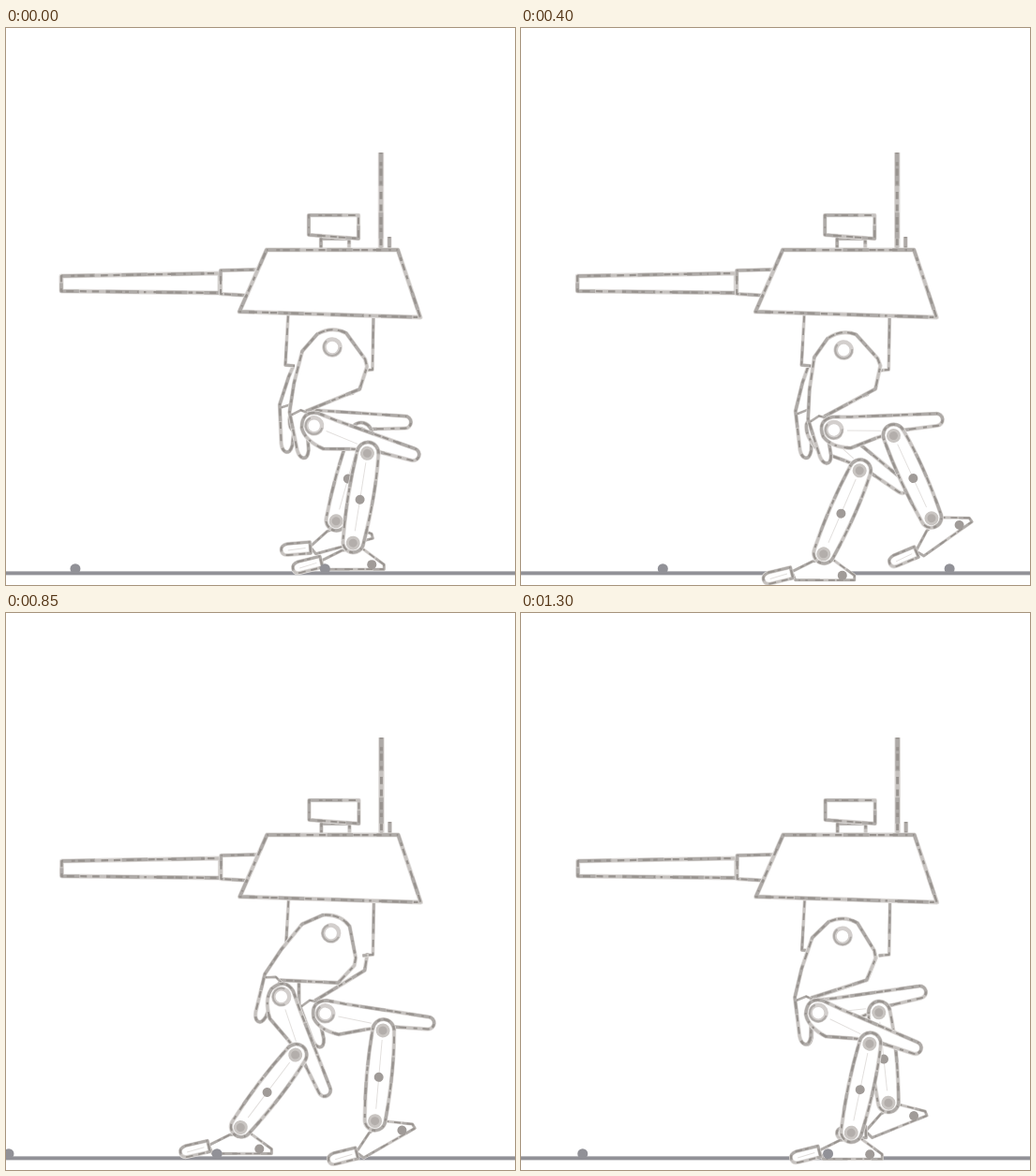
Animation, 543 px wide and 595 px high, one loop 1.4 s. Source, as an HTML page with a canvas:

```html
<!DOCTYPE html>
<html lang="en">
<head>
<meta charset="utf-8">
<title>Walking turret</title>
<style>
html, body { margin: 0; width: 100%; height: 100%; overflow: hidden; background: #fff; }
canvas { display: block; }
</style>
</head>
<body>
<canvas id="stage" width="543" height="595"></canvas>
<script>
const ctx = document.getElementById('stage').getContext('2d');
const LOOP = 1400, STEPS = 19, STRIDE = 328;
const THIGH = 86, ARM = 64, SHIN = 97, ARM_BEND = 11.5;
const GROUND = '#919197';

const rad = deg => deg * Math.PI / 180;
const mix = (a, b, k) => a + (b - a) * k;

// Drawings last 50 ms; the ones held here last twice as long.
const held = [0, 7, 9, 10, 14, 15, 16, 17, 18];
function stepAt(time) {
  let step = -1;
  while (time >= 0) time -= held.includes(++step) ? 100 : 50;
  return step;
}

// One walking cycle in degrees: thigh, arm, shin, foot, toe droop.
const gait = [
  [38, 65, 37, 0, 13],    // reach
  [18, 67, 46, 0, 13],    // plant
  [18, 20, 12, 0, 14],    // mid stance
  [13, 16, 9, 0, 14],     // late stance
  [4, 5, 5, -30, 14],     // heel up
  [6, 8, -10, -31, 14],   // push
  [2, -3, -34, -42, 33],  // toe off
  [17, -12, -6, -22, 2],  // pass
  [30, 18, 48, -5, 9]     // swing
];

// Key points [step, value]; gait values count poses and run on past the cycle's end.
const nearGait = [[0, 3], [5, 5], [8, 7], [10, 8], [13, 9], [13.5, 10], [16, 11], [18, 11.1], [19, 12]];
const farGait = [[0, 7.4], [2.5, 8], [5, 10], [8, 11], [13, 13], [16, 15], [18, 16], [19, 16.4]];
const travel = [[0, 0], [5, 52], [8, 141], [13, 203], [16, 312], [18, 315], [19, STRIDE]];

function valueAt(keys, step) {
  const i = keys.findIndex(key => key[0] > step);
  const [s0, v0] = keys[i - 1], [s1, v1] = keys[i];
  return mix(v0, v1, (step - s0) / (s1 - s0));
}

function poseAt(phase) {
  const i = Math.floor(phase);
  const next = gait[(i + 1) % gait.length];
  return gait[i % gait.length].map((v, n) => mix(v, next[n], phase - i));
}

let seed = 7;
function random() {
  seed = seed * 16807 % 2147483647;
  return seed / 2147483647;
}
const grain = Array.from({ length: 24 }, () => 1.5 + random() * 8);
const shade = Array.from({ length: 10 }, () => 8 + random() * 30);

function stroke(path, width, color, dash = []) {
  ctx.setLineDash(dash);
  ctx.lineWidth = width;
  ctx.strokeStyle = color;
  ctx.stroke(path);
}

// Soft grey line of uneven darkness.
function pencil(path, width = 4.5, fill = '#fff') {
  if (fill) { ctx.fillStyle = fill; ctx.fill(path); }
  ctx.lineJoin = 'round';
  stroke(path, width, '#e0dddb');
  stroke(path, width * 0.65, '#c6c2bf');
  stroke(path, width * 0.7, '#aeaaa7', shade);
  stroke(path, width * 0.45, '#98938f', grain);
}

function poly(points, closed = true) {
  const path = new Path2D();
  points.forEach(([x, y]) => path.lineTo(x, y));
  if (closed) path.closePath();
  return path;
}

function disc(x, y, r) {
  const path = new Path2D();
  path.arc(x, y, r, 0, Math.PI * 2);
  return path;
}

function spot(x, y, r, color = '#a09b98') {
  ctx.fillStyle = color;
  ctx.fill(disc(x, y, r));
}

function hinge() {
  stroke(disc(0, 0, 8.5), 4.5, '#d3cfcd');
  stroke(disc(0, 0, 9), 2, '#aeaaa7', shade);
}

const faint = (...points) => stroke(poly(points, false), 1, '#e2dfdd');

// Draws in a turned frame and returns where its local point (px, py) lands.
function at([x, y], degrees, draw, px = 0, py = 0) {
  const c = Math.cos(rad(degrees)), s = Math.sin(rad(degrees));
  ctx.save();
  ctx.translate(x, y);
  ctx.rotate(rad(degrees));
  draw();
  ctx.restore();
  return [x + px * c - py * s, y + px * s + py * c];
}

const thighShape = new Path2D(
  'M-46 69 L-41 38 L-32 4 L-16 -14 Q0 -23 15 -15 L35 13 L37 21 L29 45 L-28 68' +
  ' L-26 110 Q-27 119 -32 118 Q-36 117 -38 110 Z');
const armShape = new Path2D(
  'M-12 6 Q-17 -12 0 -14 L20 -12 L110 -6 A6.5 6.5 0 0 1 110 7 L68 8 L45 13 L16 21 Q-5 18 -12 6 Z');
const shinShape = new Path2D(
  'M-11 0 A11.5 12 0 0 1 12 0 Q16 42 11 96 A11 11 0 0 1 -11 96 Q-15 48 -11 0 Z');
const footShape = poly([[-34, 19], [-12, 8], [10, 6], [33, 23], [33, 28], [-30, 28]]);
const toeShape = new Path2D('M0 -6 L-24 -6 Q-31 -5 -31 0 Q-31 6 -24 6 L0 6 Z');

function drawThigh() {
  pencil(thighShape);
  pencil(poly([[-44, 72], [-34, 67], [-26, 70]], false), 3, null);
  hinge();
}

function drawArm() {
  pencil(armShape);
  faint([14, 2], [50, 6]);
  hinge();
}

function drawShin() {
  pencil(shinShape);
  faint([0, 10], [0, 84]);
  for (const y of [0, SHIN]) {
    spot(0, y, 7.5, '#c9c5c2');
    spot(0, y, 4.5, '#b3aeab');
  }
  spot(0, 50, 5);
}

function drawFoot() {
  pencil(footShape, 3.5);
  spot(20, 23, 5);
}

function drawToe() {
  pencil(toeShape, 4);
  faint([-24, 1], [-5, 0]);
}

function drawLeg(hip, [thigh, arm, shin, foot, toe]) {
  const hang = 13.4; // lean of the thigh as its outline is written
  const knee = at(hip, thigh - hang, drawThigh, -THIGH * Math.sin(rad(hang)), THIGH * Math.cos(rad(hang)));
  const bend = rad(ARM_BEND);
  const joint = at(knee, arm, () => {}, ARM * Math.cos(bend), ARM * Math.sin(bend));
  const ankle = at(joint, shin, () => {}, 0, SHIN);
  const ball = at(ankle, foot, drawFoot, -34, 20);
  at(ball, -toe, drawToe);
  at(knee, arm, drawArm);
  at(joint, shin, drawShin);
}

function drawNeck() {
  ctx.fillStyle = '#fff';
  ctx.fillRect(299, 303, 93, 60);
  pencil(poly([[308, 361], [298, 360], [301, 306]], false), 4, null);
  pencil(poly([[392, 307], [391, 365], [380, 366]], false), 4, null);
}

function drawHull() {
  pencil(poly([[59, 265], [228, 262], [228, 283], [59, 281]]), 5);
  pencil(poly([[229, 259], [270, 258], [262, 286], [229, 284]]));
  pencil(poly([[400, 133], [400, 237]], false), 6.5, null);
  pencil(poly([[409, 223], [409, 237]], false), 5, null);
  pencil(poly([[336, 225], [366, 225], [366, 237], [336, 237]]));
  pencil(poly([[323, 200], [376, 200], [376, 225], [323, 221]]));
  pencil(poly([[278, 237], [418, 237], [442, 309], [249, 303]]), 5);
}

// Ground marks gain speed as they cross the stage.
function drawMarks(distance) {
  for (let pass = -1; pass < 2; pass++) {
    const d = distance + pass * STRIDE + 125;
    if (d >= 0) spot(3 + d / 2 + 0.00054 * d * d, 577.7, 5.5, GROUND);
  }
}

function draw(step) {
  const distance = valueAt(travel, step);
  const sink = distance % (STRIDE / 2) / (STRIDE / 2); // settles over each half stride
  const hip = [348 - 5.5 * sink, 341 + 4.5 * sink];
  const sway = [1.8 * sink, 0];
  ctx.fillStyle = '#fff';
  ctx.fillRect(0, 0, 543, 595);
  ctx.fillStyle = GROUND;
  ctx.fillRect(0, 580.4, 543, 4);
  drawLeg(hip, poseAt(valueAt(farGait, step)));
  at(sway, 0, drawNeck);
  drawLeg(hip, poseAt(valueAt(nearGait, step)));
  at(sway, 0, drawHull);
  drawMarks(distance);
}

function tick() {
  draw(stepAt(performance.now() % LOOP));
  requestAnimationFrame(tick);
}
tick();
</script>
</body>
</html>
```
